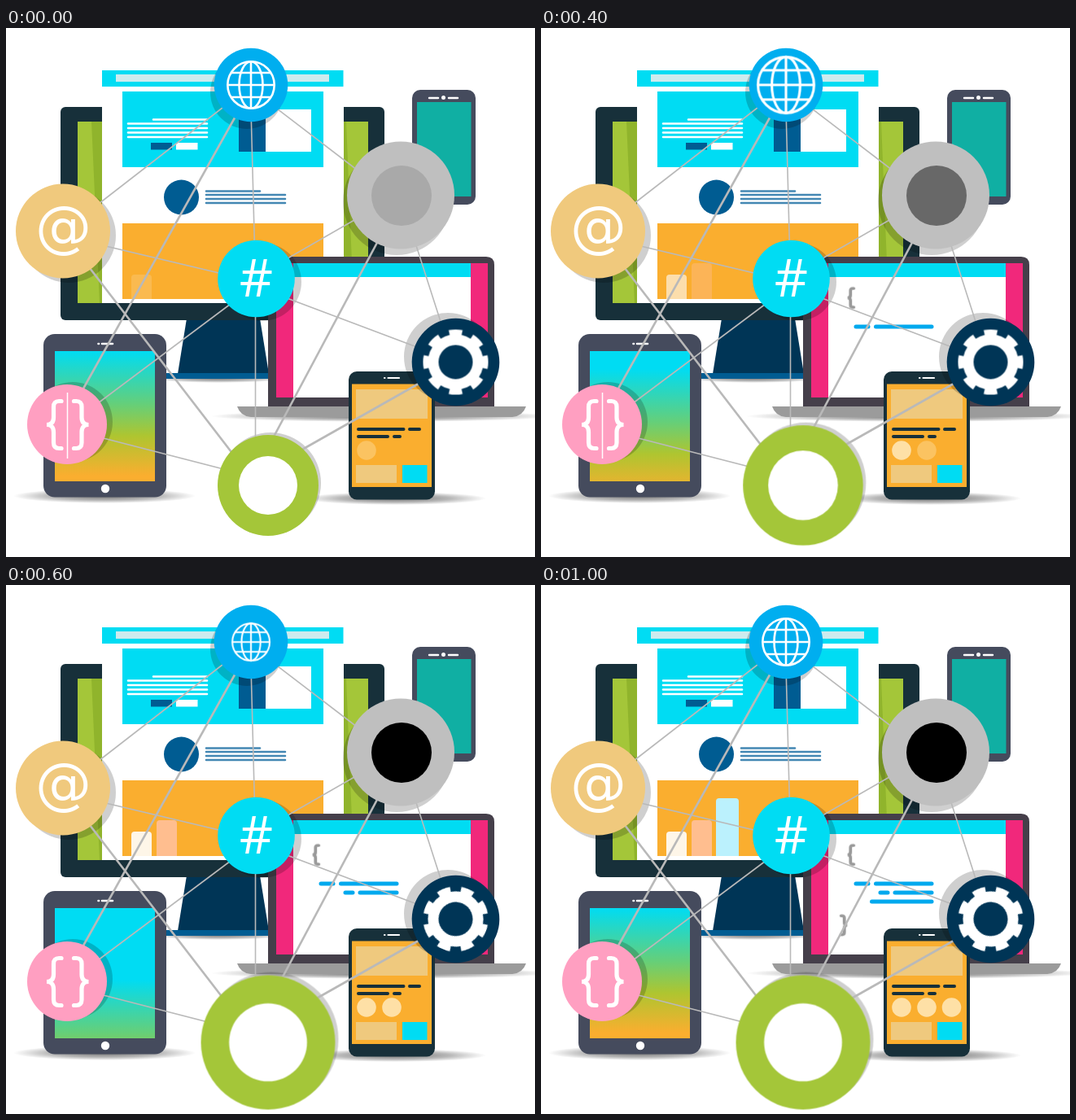
An HTML page without scripts for the animation above (1.2 s loop, 650 px wide and 650 px high).

```html
<!DOCTYPE html>
<html lang="en">
<head>
<meta charset="utf-8">
<title>Connected devices</title>
<style>
html, body { margin: 0; width: 100%; height: 100%; overflow: hidden; background: #fff; }
svg { display: block; width: 100vw; height: 100vh; }
.navy { fill: #17303a; }
.slate { fill: #454b5d; }
.cyan { fill: #00dcf3; }
.orange { fill: #faae2f; }
.blue { fill: #005c92; }
.white { fill: #fff; }
.pink { fill: #f1287b; }
.line { fill: none; stroke-linecap: round; }
.shade { fill: #000; fill-opacity: .19; }

.anim { animation: 1.2s step-end infinite; }
.disc { animation-name: disc; }
.globe { animation-name: globe; }
.gear { animation-name: gear; }
.screen { animation-name: screen; }
.fade { animation-name: fade; }
.thick { animation-name: thick; }
.thin { animation-name: thin; }
.caret { animation-name: caret; }
.bar { animation-name: bar; }
.in0 { animation-name: in0; }
.in2 { animation-name: in2; }
.in4 { animation-name: in4; }
.on1 { animation-name: on1; }
.on2 { animation-name: on2; }
.on3 { animation-name: on3; }
.on4 { animation-name: on4; }
.on5 { animation-name: on5; }

@keyframes disc {
  0%, 66.66% { transform: scale(1); }
  16.66% { transform: scale(1.365); }
  33.33% { transform: scale(1.19); }
  50%, 83.33% { transform: scale(1.33); }
}
@keyframes globe {
  0%, 66.66% { transform: scale(1); }
  16.66% { transform: scale(.62); }
  33.33% { transform: scale(1.2); }
  50% { transform: scale(.8); }
}
@keyframes gear {
  0%, 33.33%, 66.66% { transform: rotate(0deg); }
  16.66%, 50%, 83.33% { transform: rotate(22.5deg); }
}
@keyframes screen {
  0%, 83.33% { transform: translateY(0); }
  16.66% { transform: translateY(-65px); }
  33.33% { transform: translateY(22px); }
  50% { transform: translateY(88px); }
  66.66% { transform: translateY(-68px); }
}
@keyframes fade {
  0% { fill: #a9a9a9; }
  16.66% { fill: #8d8d8d; }
  33.33% { fill: #686868; }
  50%, 83.33% { fill: #000; }
  66.66% { fill: #323234; }
}
@keyframes thick { 0%, 33.33%, 83.33% { opacity: 1; } 16.66%, 66.66% { opacity: 0; } 50% { opacity: 1; } }
@keyframes thin { 0%, 33.33%, 83.33% { opacity: 0; } 16.66%, 66.66% { opacity: 1; } 50% { opacity: 0; } }
@keyframes caret { 0%, 33.33%, 66.66% { opacity: 1; } 16.66%, 50%, 83.33% { opacity: 0; } }
@keyframes bar { 0% { opacity: .18; } 16.66% { opacity: .45; } 33.33% { opacity: .68; } 50%, 100% { opacity: 1; } }
@keyframes in0 { 0% { opacity: .42; } 16.66%, 100% { opacity: 1; } }
@keyframes in2 { 0% { opacity: 0; } 33.33% { opacity: .42; } 50%, 100% { opacity: 1; } }
@keyframes in4 { 0% { opacity: 0; } 66.66% { opacity: .48; } 83.33%, 100% { opacity: 1; } }
@keyframes on1 { 0% { opacity: 0; } 16.66%, 100% { opacity: 1; } }
@keyframes on2 { 0% { opacity: 0; } 33.33%, 100% { opacity: 1; } }
@keyframes on3 { 0% { opacity: 0; } 50%, 100% { opacity: 1; } }
@keyframes on4 { 0% { opacity: 0; } 66.66%, 100% { opacity: 1; } }
@keyframes on5 { 0% { opacity: 0; } 83.33%, 100% { opacity: 1; } }
</style>
</head>
<body>
<svg viewBox="0 0 650 650">
  <defs>
    <radialGradient id="soft">
      <stop offset="0" stop-opacity=".55"/>
      <stop offset=".6" stop-opacity=".28"/>
      <stop offset="1" stop-opacity="0"/>
    </radialGradient>
    <linearGradient id="sky" gradientUnits="userSpaceOnUse" x1="0" y1="397" x2="0" y2="550">
      <stop offset="0" stop-color="#00dcf3"/>
      <stop offset=".43" stop-color="#66cf78"/>
      <stop offset=".68" stop-color="#aec530"/>
      <stop offset="1" stop-color="#faae2f"/>
    </linearGradient>
    <clipPath id="tablet"><rect x="60" y="397" width="123" height="160"/></clipPath>
    <path id="brace" class="line" stroke-linecap="butt" d="M9-29H6Q-.5-29-.5-22V-9Q-.5 0-9 0Q-.5 0-.5 9V22Q-.5 29 6 29H9"/>
  </defs>

  <g fill="url(#soft)">
    <ellipse cx="262" cy="430" rx="85" ry="6"/>
    <ellipse cx="462" cy="477" rx="210" ry="7"/>
    <ellipse cx="121" cy="575" rx="112" ry="9"/>
    <ellipse cx="478" cy="578" rx="112" ry="8"/>
  </g>

  <!-- monitor -->
  <path fill="#003556" d="M222 357H312L323 425H211Z"/>
  <rect class="blue" x="194" y="424" width="136" height="7" rx="2"/>
  <rect class="navy" x="67" y="97" width="398" height="262" rx="6"/>
  <path fill="#a4c639" d="M88 115H445V338H88Z"/>
  <path fill="#90b42c" d="M105 115H118V338H115ZM415 115H418L427 338H415Z"/>
  <path class="white" d="M118 72H415V338H118Z"/>
  <path class="cyan" d="M118 52H414.500V72H118ZM143 78H390V171H143Z"/>
  <path fill="#cdebee" d="M135 57H397V66H135Z"/>
  <path class="line" stroke="#fff" stroke-width="2.6" d="M181 112.500H247M150 117.500H247M150 123H247M150 128.500H247M150 134H247"/>
  <path class="blue" d="M178 141H204V149.500H178ZM286 100H319V152H286Z"/>
  <path class="white" d="M209 141H235.500V149.500H209ZM319 100H375V152H319Z"/>
  <circle class="blue" cx="215.500" cy="208" r="21.500"/>
  <path class="line" stroke="#4387b3" stroke-width="2.600" d="M246 200.500H312M246 205H343M246 210H343M246 215H343"/>
  <path class="orange" d="M143 240H390V333H143Z"/>
  <path class="anim bar" fill="#fef6e8" d="M154 333V307Q154 303 158 303H175Q179 303 179 307V333Z"/>
  <path class="anim in2" fill="#ffbe8f" d="M185 333V293Q185 289 189 289H206Q210 289 210 293V333Z"/>
  <path class="anim in4" fill="#bbf1fd" d="M215 333V266Q215 262 219 262H239Q243 262 243 266V333Z"/>

  <!-- upper phone -->
  <rect class="slate" x="499" y="76" width="78" height="141" rx="10"/>
  <path fill="#10afa3" d="M505 91H571.500V207H505Z"/>
  <path class="line" stroke="#fff" stroke-width="2.400" d="M520 86H531M544 86H555"/>
  <circle class="white" cx="537.500" cy="85.500" r="2.500"/>

  <!-- laptop -->
  <path fill="#453f4a" d="M322 466V291Q322 281 332 281H590Q600 281 600 291V466Z"/>
  <path class="pink" d="M332 289H592V454H332Z"/>
  <path class="white" d="M353 306H571V454H353Z"/>
  <path class="cyan" d="M353 289H571V306H353Z"/>
  <path fill="#9b9b9b" d="M284 465H639Q635 477 622 478H301Q288 477 284 465Z"/>
  <g stroke="#999" stroke-width="9">
    <use class="anim on1" href="#brace" x="0" y="0" style="transform-origin:0 0" transform="translate(380.500 331.500) scale(.42 .4)"/>
  </g>
  <g class="anim on5" stroke="#999" stroke-width="9">
    <use href="#brace" transform="translate(372.500 418) scale(-.42 .4)"/>
  </g>
  <g class="line" stroke="#00a9ee" stroke-width="5">
    <path class="anim on2" d="M387 367H402M411.500 367H480"/>
    <path class="anim on3" d="M417 378H426M435 378H480"/>
    <path class="anim on4" d="M406.500 389H480"/>
  </g>

  <!-- tablet -->
  <rect class="slate" x="46" y="376" width="151" height="200.500" rx="14"/>
  <g clip-path="url(#tablet)">
    <rect class="anim screen" x="60" y="250" width="123" height="450" fill="url(#sky)"/>
  </g>
  <path class="line" stroke="#fff" stroke-width="2.600" d="M113.500 388H114M118 388H131"/>
  <circle class="white" cx="122" cy="566" r="5.200"/>

  <!-- lower phone -->
  <rect class="navy" x="421" y="422" width="106" height="157.500" rx="10"/>
  <path class="orange" d="M425 437.500H523V564H425Z"/>
  <path class="line" stroke="#fff" stroke-width="2.200" d="M465 430H465.500M469.500 430H483"/>
  <path fill="#efc97e" d="M430 444H518V480H430ZM430 537H480V559H430Z"/>
  <path class="cyan" d="M487 537H517.500V559H487Z"/>
  <path class="line" stroke="#17303a" stroke-width="4" d="M433 493H488.500M496 493H508M433 502H469M477 502H484"/>
  <g fill="#fee0a6">
    <circle class="anim in0" cx="443" cy="519" r="11.800"/>
    <circle class="anim in2" cx="474" cy="519" r="11.800"/>
    <circle class="anim in4" cx="504.500" cy="519" r="11.800"/>
  </g>

  <!-- disc shadows -->
  <g class="shade">
    <circle cx="296" cy="79" r="45"/>
    <circle cx="77" cy="255" r="58"/>
    <circle cx="480" cy="213" r="66"/>
    <circle cx="315" cy="312" r="48"/>
    <circle cx="543" cy="404" r="54"/>
    <circle cx="82" cy="484" r="49"/>
  </g>
  <g transform="translate(322 562)"><circle class="anim disc shade" cx="3" cy="-3" r="62"/></g>

  <!-- links -->
  <g class="line" stroke="#b9b9b9">
    <path stroke-width="1.600" d="M110 219L275 91M301 100L305.500 270M325 93L440 181M110 265L270 303M280 336L105 467M306.500 345V520M340 286.500L435 232M340 330L510 394M501 258L537 370M110 501.500L275 544"/>
    <path stroke-width="2.600" d="M284 105L90 452M96 286L290 538M458 260L320 519M515 432.500L355 523"/>
  </g>

  <!-- discs -->
  <circle fill="#00aeef" cx="301" cy="70" r="45.300"/>
  <g transform="translate(301 70)">
    <g class="anim globe line" stroke="#fff" stroke-width="2.600">
      <circle r="28.700"/>
      <ellipse rx="14.500" ry="28.700"/>
      <path stroke-linecap="butt" d="M0-28V28M-28 0H28M-24-15H24M-24 15H24"/>
    </g>
  </g>

  <circle fill="#f0c97d" cx="70" cy="249.500" r="58"/>
  <text class="white" x="70.500" y="268" font-family="'DejaVu Sans', sans-serif" font-size="69" text-anchor="middle">@</text>

  <circle fill="#bfbfbf" cx="485" cy="205.500" r="66"/>
  <circle class="anim fade" cx="486" cy="206" r="37"/>

  <circle class="cyan" cx="307.500" cy="308" r="47.300"/>
  <text class="white anim thick" x="307.500" y="329.500" font-family="'Open Sans', sans-serif" font-size="64" text-anchor="middle">#</text>
  <path class="line anim thin" stroke="#fff" stroke-width="2" d="M299.500 276L291.500 335M322.500 276L314.500 335M284 294.500H333M281 316.500H331"/>

  <circle fill="#003556" cx="552.500" cy="410.500" r="53.800"/>
  <g transform="translate(552.500 410.500)">
    <g class="anim gear" fill="none" stroke="#fff">
      <circle r="27.500" stroke-width="13"/>
      <circle r="36.300" stroke-width="7.500" pathLength="16" stroke-dasharray="1.100 .9" stroke-dashoffset=".55"/>
    </g>
  </g>

  <circle fill="#ff9fc1" cx="75" cy="487" r="49"/>
  <g stroke="#fff" stroke-width="5.200">
    <use href="#brace" transform="translate(59 487.500)"/>
    <use href="#brace" transform="translate(92.500 487.500) scale(-1 1)"/>
    <path class="anim caret" stroke-width="1.500" d="M75.500 448V529"/>
  </g>

  <g transform="translate(322 562)">
    <g class="anim disc">
      <circle fill="#a4c639" r="62"/>
      <circle class="white" r="36"/>
    </g>
  </g>
</svg>
</body>
</html>
```
